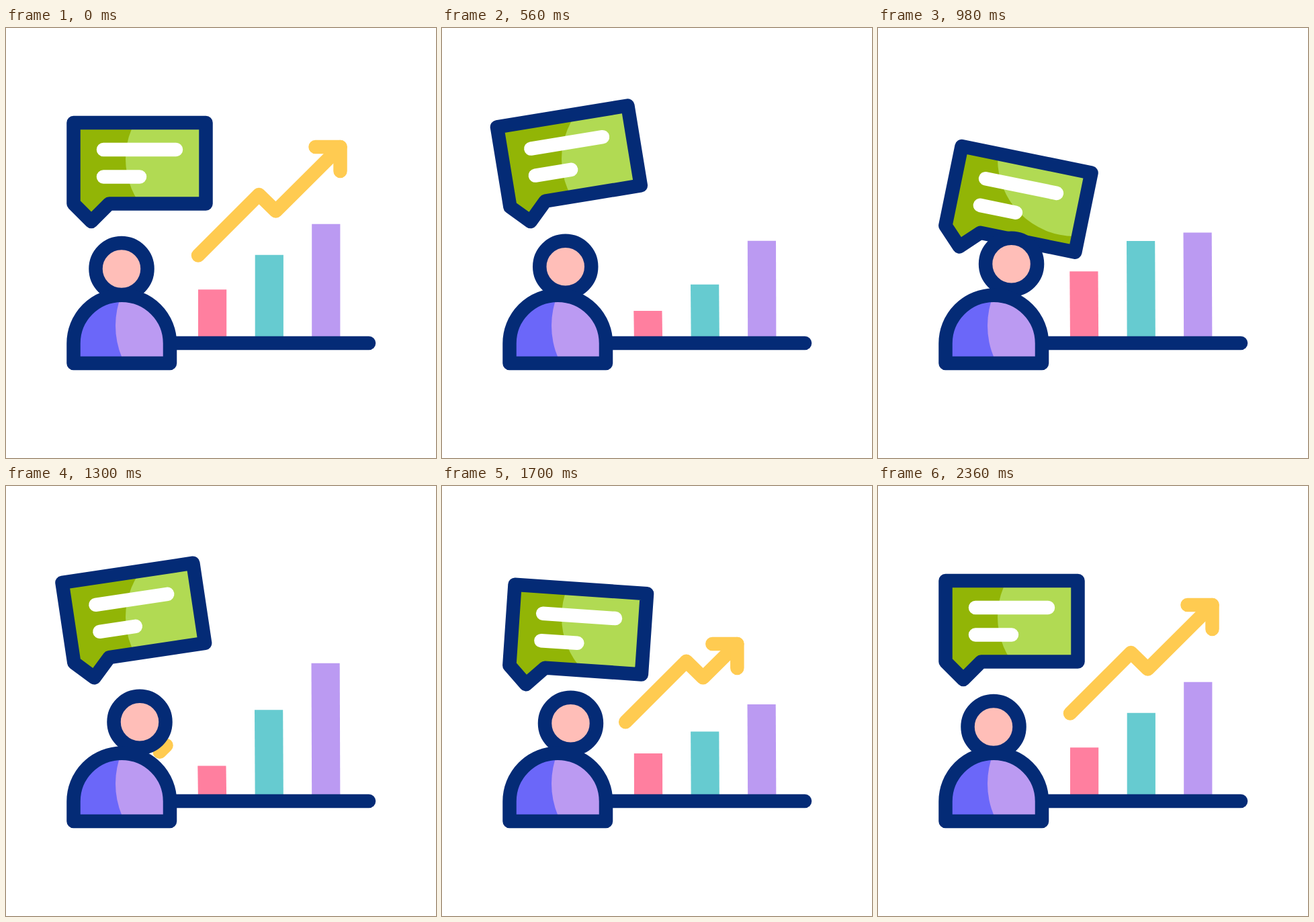
Animation, 640 px wide and 640 px high, one loop 2.4 s. Source, as an HTML page:

```html
<!DOCTYPE html>
<html lang="en">
<head>
<meta charset="utf-8">
<title>Growth report</title>
<style>
  html, body { margin: 0; width: 100%; height: 100%; overflow: hidden; background: #fff; }
  svg { display: block; width: 100%; height: 100%; }
  .line { fill: none; stroke-width: 20.5; stroke-linecap: round; stroke-linejoin: round; }
  .navy { stroke: #042b76; }
  .gold { stroke: #ffcb51; }
  .white { stroke: #fff; }
</style>
</head>
<body>
<svg viewBox="0 0 640 640">
  <defs>
    <path id="bubble" d="M100.5 141H297.5V261.5H153.5L127 288L100.5 261.5Z"/>
    <path id="body" d="M100.5 499H244V469.5A71.75 71.75 0 0 0 100.5 469.5Z"/>
    <clipPath id="bubbleClip"><use href="#bubble" class="talk"/></clipPath>
    <clipPath id="bodyClip"><use href="#body"/></clipPath>
  </defs>

  <g id="arrow" class="line gold">
    <path id="shaft" d="M286 338.5L376.5 248L401.5 272.5L497.5 177"/>
    <path id="tip" d="M460.5 177H497.5V213"/>
  </g>

  <path class="bar" fill="#ff7f9f"/>
  <path class="bar" fill="#66cbd0"/>
  <path class="bar" fill="#bb9af2"/>

  <g clip-path="url(#bubbleClip)">
    <path fill="#92b506" d="M0 0H400V400H0Z"/>
    <circle cx="293" cy="195" r="115" fill="#b1da53"/>
  </g>
  <g class="talk">
    <use href="#bubble" class="line navy"/>
    <path class="line white" d="M145 181H253M145 221.5H199"/>
  </g>

  <circle id="head" class="line navy" cx="172" cy="358.5" r="38.5" style="fill:#ffbeb8"/>
  <path class="line navy" d="M244 469H540"/>
  <g clip-path="url(#bodyClip)">
    <path fill="#6b67f9" d="M90 390H260V510H90Z"/>
    <circle cx="286" cy="443" r="123" fill="#bb9af2"/>
  </g>
  <use href="#body" class="line navy"/>
</svg>
<script>
const LOOP = 2400;
const $ = id => document.getElementById(id);
const all = name => [...document.querySelectorAll(name)];

// Tracks are [time, value] steps joined by an ease in and out.
const TURN = [[0, 0], [415, -18.4], [855, 17], [1280, -8.6], [1700, 3.9], [2140, 0]];
const BOB = [[0, 0], [300, 45], [680, -13], [1015, 39.5], [1450, -18], [1760, 10], [1980, -2], [2140, 0]];
const NOD = [[150, 0], [1050, 1], [1350, 1], [2360, 0]];
const SWAY = [[0, 0], [430, 45.5], [912, -30.5], [1400, 34], [1850, 0]];
const LEAN = [[0, 0], [430, -0.7], [1400, -0.7], [1850, 0]];
const LEAVE = [[0, 0], [560, 1]];
const ENTER = [[1210, 0], [1910, 1]];

const BARS = [
  { x: 286, top: 389.3, delay: 0 },
  { x: 370.7, top: 337.8, delay: 177 },
  { x: 455.2, top: 291.8, delay: 332 }
];

const ease = x => x * x * (3 - 2 * x);

function at(track, t) {
  if (t <= track[0][0]) return track[0][1];
  for (let i = 1; i < track.length; i++) {
    const [t0, a] = track[i - 1], [t1, b] = track[i];
    if (t < t1) return a + (b - a) * ease((t - t0) / (t1 - t0));
  }
  return track[track.length - 1][1];
}

const arrow = $('arrow'), shaft = $('shaft'), tip = $('tip'), head = $('head');
const talk = all('.talk'), bars = all('.bar');
const total = shaft.getTotalLength();

function drawArrow(t) {
  const leaving = t < 560;
  arrow.style.display = leaving || t > 1210 ? '' : 'none';
  const p = at(leaving ? LEAVE : ENTER, t);
  const from = leaving ? p * total : 0;
  const to = leaving ? total : p * total;
  const shift = leaving ? 80 * p : -60 * (1 - p);
  arrow.setAttribute('transform', `translate(${shift} ${-shift})`);
  shaft.setAttribute('stroke-dasharray', `${Math.max(to - from, 0.01)} ${total * 2}`);
  shaft.setAttribute('stroke-dashoffset', -from);

  const end = shaft.getPointAtLength(to);
  const size = leaving ? 1 : Math.min(1, Math.max(0, (p - 0.06) / 0.3));
  tip.style.display = size ? '' : 'none';
  tip.setAttribute('transform',
    `translate(${end.x} ${end.y}) scale(${size}) translate(-497.5 -177)`);
}

function draw(t) {
  drawArrow(t);

  bars.forEach((bar, i) => {
    const { x, top, delay } = BARS[i];
    const y = top + at(SWAY, t - delay);
    const left = x + at(LEAN, t - delay);
    bar.setAttribute('d', `M${x} 469L${left} ${y}h42.2L${x + 42.2} 469Z`);
  });

  const pose = `translate(0 ${at(BOB, t)}) rotate(${at(TURN, t)} 127 258)`;
  talk.forEach(el => el.setAttribute('transform', pose));

  const nod = at(NOD, t);
  head.setAttribute('transform', `translate(${27 * nod} ${-7.3 * nod})`);
}

const start = performance.now();
function tick() {
  draw((performance.now() - start) % LOOP);
  requestAnimationFrame(tick);
}
tick();
</script>
</body>
</html>
```
